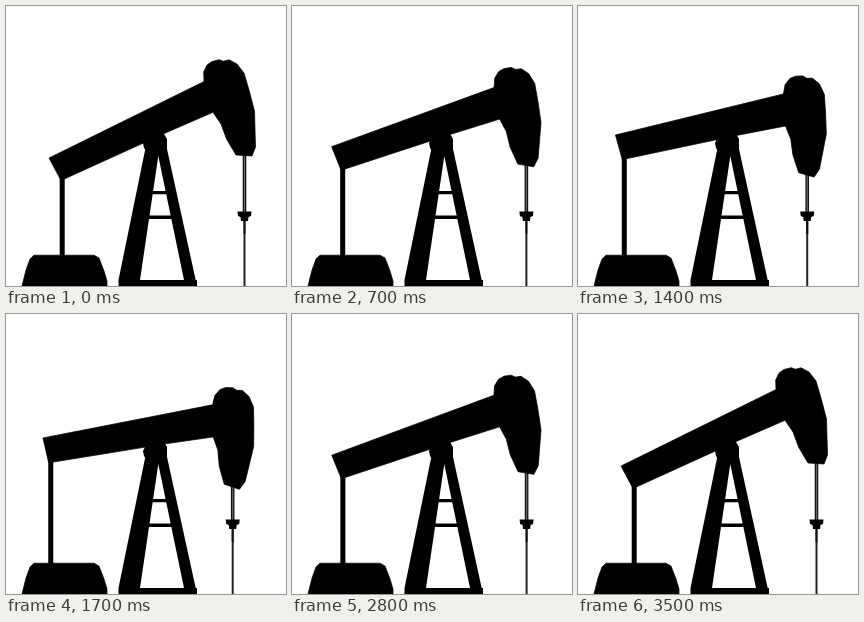
An HTML page that plays this animation: 280x280 px, repeating every 3600 ms.

```html
<!DOCTYPE html>
<html lang="en">
<head>
<meta charset="utf-8">
<title>Pump jack</title>
<style>
  html, body { margin: 0; width: 100%; height: 100%; overflow: hidden; background: #fff; }
  svg { display: block; width: 100vw; height: 100vh; }
  .solid { stroke: #000; stroke-width: .7; stroke-linejoin: round; }
</style>
</head>
<body>
<svg viewBox="0 0 280 280">
  <path class="solid" d="M16 280L20 264 24 253 28 249.2H88L93 252 98 265 101 275V280Z"/>

  <!-- tower -->
  <path fill-rule="evenodd" d="M139.5 142L112.5 274V280H191V274H189.7L160.8 142ZM152.3 150L178 274H134Z"/>
  <path d="M146 186.6H161M141 211.3H166" stroke="#000" stroke-width="3.4"/>
  <path d="M138 142L137 137 140 131 147 128H158L161 133V143L157 145H140Z"/>

  <rect id="crankRod" width="5" fill="#000"/>

  <g id="polishedRod">
    <rect id="rodEdge" x="-1.8" width="3.6" fill="#111"/>
    <rect id="rodShine" x="-.6" width="1.2" fill="#666"/>
    <path d="M-7 205.5H7L6.5 210 4 211 3.5 215H-3.5L-4 211-6.5 210Z"/>
    <path d="M0 214V228" stroke="#111" stroke-width="2.4"/>
    <path d="M0 228V280" stroke="#222" stroke-width="2"/>
  </g>

  <path id="beam" class="solid" d="M43 152L198 75.5 197.7 66 201 59 206 55.5 213 53.7 217.5 55.2 223 53.8 231 58 238 67 243 84 248.5 105 249.5 141 246 150 230 149 220.5 133 215 118 207 106.3 161 126.3 55 174.5Z"/>
</svg>
<script>
  const STEP = 100, STEPS = 36;
  const DEGREES_PER_STEP = 0.895;
  const PIVOT = { x: 145, y: 115.5 };
  const TAIL = { x: 56.2, y: 171 };
  const HEAD = { x: 238.5, y: 148 };
  const byId = id => document.getElementById(id);
  const [beam, crankRod, polishedRod, rodEdge, rodShine] =
    ["beam", "crankRod", "polishedRod", "rodEdge", "rodShine"].map(byId);

  function rotate(point, degrees) {
    const a = degrees * Math.PI / 180;
    const x = point.x - PIVOT.x, y = point.y - PIVOT.y;
    return {
      x: PIVOT.x + x * Math.cos(a) - y * Math.sin(a),
      y: PIVOT.y + x * Math.sin(a) + y * Math.cos(a)
    };
  }

  function spanY(rect, top, bottom) {
    rect.setAttribute("y", top);
    rect.setAttribute("height", bottom - top);
  }

  function draw(ms) {
    const step = Math.floor(ms / STEP) % STEPS;
    const swing = step < STEPS / 2 ? step : Math.max(0, STEPS - 1.3 - step);
    const angle = swing * DEGREES_PER_STEP;
    const tail = rotate(TAIL, angle), head = rotate(HEAD, angle);

    beam.setAttribute("transform", `rotate(${angle} ${PIVOT.x} ${PIVOT.y})`);
    crankRod.setAttribute("x", tail.x - 2.5);
    spanY(crankRod, tail.y, 251);
    polishedRod.setAttribute("transform", `translate(${head.x} 0)`);
    spanY(rodEdge, head.y, 206);
    spanY(rodShine, head.y, 206);
  }

  const start = performance.now();
  function tick() {
    draw(performance.now() - start);
    requestAnimationFrame(tick);
  }
  draw(0);
  requestAnimationFrame(tick);
</script>
</body>
</html>
```
